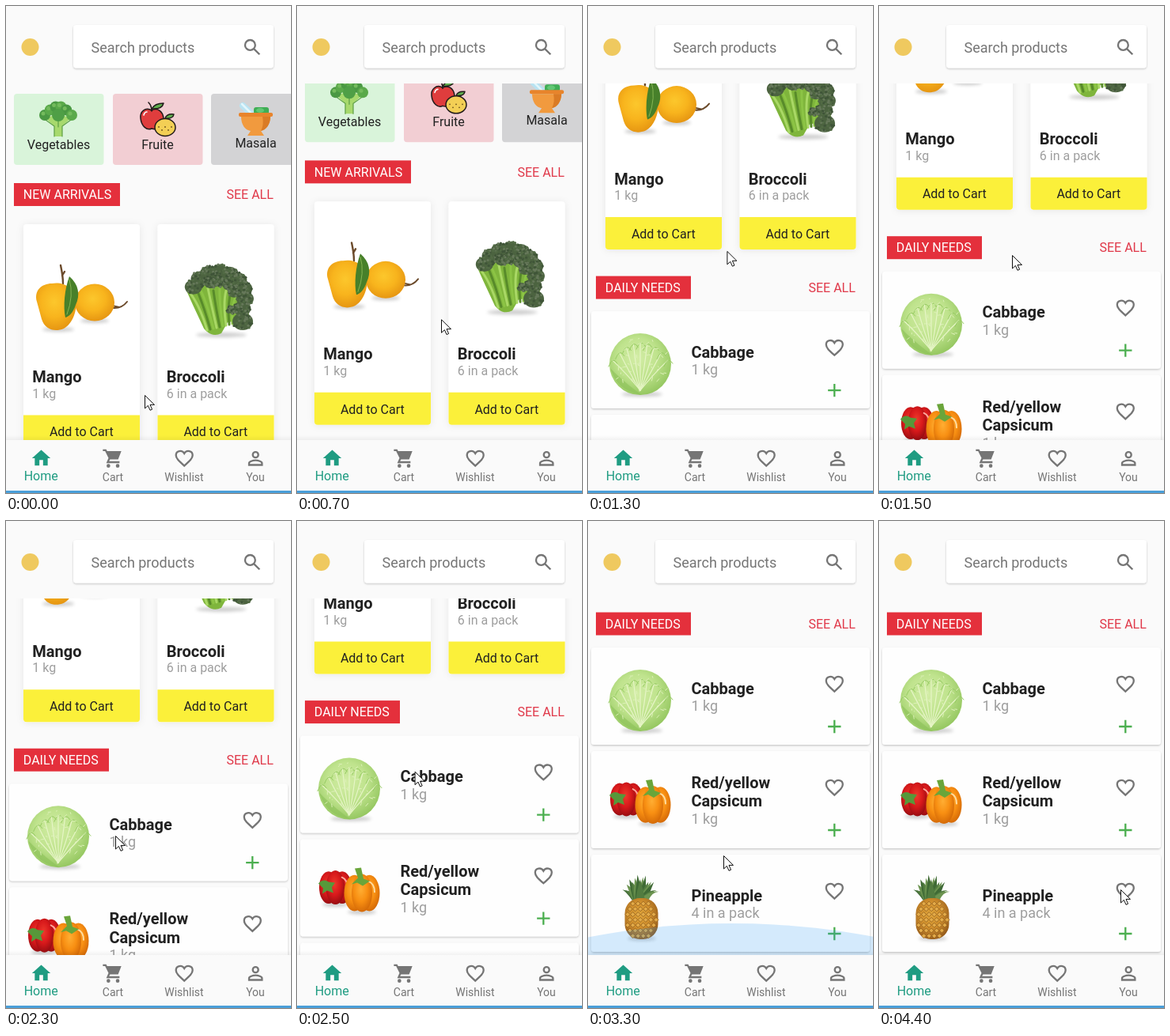
An HTML page for the animation above (5 s loop, 360 px wide and 616 px high).

```html
<!DOCTYPE html>
<html lang="en">
<head>
<meta charset="utf-8">
<title>Grocery shop</title>
<style>
html, body { margin: 0; width: 100%; height: 100%; overflow: hidden; background: #fafafa; }
svg { display: block; width: 360px; height: 616px; font-family: Roboto, sans-serif; }
</style>
</head>
<body>
<svg viewBox="0 0 360 616">
  <defs id="defs">
    <clipPath id="view"><rect y="98" width="360" height="451"/></clipPath>
    <filter id="lift" x="-10%" y="-20%" width="120%" height="140%">
      <feDropShadow dx="0" dy="1.2" stdDeviation="1.2" flood-opacity=".22"/>
    </filter>
    <filter id="soft" x="-20%" y="-10%" width="140%" height="120%">
      <feDropShadow dx="0" dy="1" stdDeviation="5" flood-opacity=".08"/>
    </filter>
    <filter id="blur" x="-30%" y="-100%" width="160%" height="300%"><feGaussianBlur stdDeviation="2"/></filter>
    <linearGradient id="edge" x1="0" y1="0" x2="0" y2="1">
      <stop stop-opacity="0"/><stop offset="1" stop-opacity=".05"/>
    </linearGradient>
  </defs>
  <rect width="360" height="616" fill="#fafafa"/>
  <g clip-path="url(#view)">
    <g id="list"></g>
    <ellipse id="glow" cx="182" rx="540" fill="#2196f3"/>
  </g>
  <g id="bars"></g>
  <path id="mouse" d="M0 0V16.5L3.9 12.9 6.5 18.8 9.1 17.7 6.5 11.9H12Z" fill="#fff" stroke="#111" stroke-linejoin="round"/>
</svg>
<script>
const $ = id => document.getElementById(id);
const GREY = '#757575', RED = '#e4303c', GREEN = '#1f9c82', DARK = '#212121';

let seed = 7;
const rnd = () => (seed = seed * 16807 % 2147483647) / 2147483647;
const loop = (n, f) => Array.from({ length: n }, (_, i) => f(i)).join('');

const rect = (x, y, w, h, fill, more = '') =>
  `<rect x="${x}" y="${y}" width="${w}" height="${h}" fill="${fill}" ${more}/>`;
const oval = (x, y, rx, ry, fill, more = '') =>
  `<ellipse cx="${x}" cy="${y}" rx="${rx}" ry="${ry}" fill="${fill}" ${more}/>`;
const path = (d, fill, more = '') => `<path d="${d}" fill="${fill}" ${more}/>`;
const line = (d, color, w = 1) => path(d, 'none', `stroke="${color}" stroke-width="${w}" stroke-linecap="round"`);
const text = (s, x, y, size, fill, more = '') =>
  `<text x="${x}" y="${y}" font-size="${size}" fill="${fill}" ${more}>${s}</text>`;
const mid = (s, x, y, size, fill) => text(s, x, y, size, fill, 'text-anchor="middle"');
const bold = (s, x, y) => text(s, x, y, 20, DARK, 'font-weight="700"');
const shade = (x, y, rx) => oval(x, y, rx, 3, '#000', 'opacity=".2" filter="url(#blur)"');
const ring = (x, y, r) => `M${x - r} ${y}a${r} ${r} 0 1 1 ${2 * r} 0a${r} ${r} 0 1 1 ${-2 * r} 0`;

function ball(id, ...colors) {
  $('defs').innerHTML += `<radialGradient id="${id}" cx=".45" cy=".4" r=".65">` +
    colors.map((c, i) => `<stop offset="${i / 2}" stop-color="${c}"/>`).join('') + '</radialGradient>';
}
ball('mango', '#fcc72c', '#f8b41d', '#e39110');
ball('cabbage', '#d3eda6', '#bfe38d', '#8fc35a');
ball('red', '#ee3a2c', '#d8191b', '#8d0b10');
ball('orange', '#ffae33', '#f88f12', '#cf6405');
ball('pine', '#e0a53b', '#cf8e2c', '#93591a');

// Each icon is a filled part and a stroked part on a 24 unit grid.
const ICON = {
  home: ['M10 20v-6h4v6h5v-8h3L12 3 2 12h3v8z', ''],
  cart: ['M5 4H21L17.5 13H8.5Z' + ring(7, 20, 2) + ring(17, 20, 2), 'M1 3H4L8.2 11.5 6.2 16H19'],
  heart: ['', 'M12 20C6 14.6 3 11.9 3 8.5C3 3.6 9.5 2.3 12 6.6C14.5 2.3 21 3.6 21 8.5C21 11.9 18 14.6 12 20Z'],
  user: ['', ring(12, 8, 3) + 'M5 19V17C5 15.5 9 14 12 14S19 15.5 19 17V19Z'],
  search: ['', ring(9.5, 9.5, 5.5) + 'M13.5 13.5L19.7 19.7'],
  plus: ['', 'M5 12H19M12 5V19']
};
const icon = (name, x, y, color) =>
  `<g transform="translate(${x - 14} ${y - 14}) scale(1.1667)">` +
  path(ICON[name][0], color) + path(ICON[name][1], 'none', `stroke="${color}" stroke-width="2"`) + '</g>';

function mango() {
  return shade(66, 409, 20) + shade(112, 398, 18) +
    line('M135 382Q146 383 153 374M143 381L134 379', '#6b4a2b', 2) +
    oval(112, 375, 25, 23.5, 'url(#mango)') +
    line('M72 351Q72 342 69 328M71 341L74 336', '#6b4a2b', 2.4) +
    path('M39 374C35 360 45 351 58 351C72 348 87 357 89 369C90 386 84 402 73 408C61 413 49 409 45 396Z', 'url(#mango)') +
    path('M80 342C92 352 94 366 88 378C85 388 79 393 75 394C72 380 74 358 80 342Z', '#47802a') +
    line('M80 346Q86 366 77 390', '#86b654');
}

// A round tuft filled with small random buds.
function tuft(x, y, r) {
  return oval(x, y, r, r * .85, '#4c6340') + loop(35, i => {
    const a = rnd() * 6.283, d = Math.sqrt(rnd()) * r;
    return oval(x + d * Math.cos(a), y + d * .88 * Math.sin(a), 1.6, 1.5, ['#3f5438', '#66785a', '#526b45'][i % 3]);
  });
}

function broccoli() {
  const fan = (n, from, to, k, r) => loop(n, i => {
    const a = (from + (to - from) * i / (n - 1)) * Math.PI;
    return tuft(268 + 34 * k * Math.cos(a), 368 + 32 * k * Math.sin(a), r);
  });
  return shade(272, 416, 32) +
    path('M227 358L236 378 250 408Q260 420 272 414L280 400 308 396 300 352 262 344Z', '#7fb53c') +
    loop(9, i => line(`M${230 + i * 8} ${360 - i % 2 * 8}Q${244 + i * 5} 376 ${254 + i * 4} ${410 - i}`,
      ['#a9d865', '#588b2a', '#8cc445'][i % 3], 3)) +
    fan(9, 1.13, 2.15, 1, 11) + fan(4, 1.35, 1.9, .62, 8) + tuft(299, 399, 13) + tuft(285, 384, 6);
}

function cabbage() {
  return shade(68, 265, 26) + oval(66, 227, 39, 39, 'url(#cabbage)') +
    path('M28 232C36 256 50 262 68 266C46 250 36 240 28 232Z', '#8cc259', 'opacity=".6"') +
    loop(9, i => {
      const k = i / 4 - 1, x = 66 + 35 * k, y = 200 + 22 * k * k;
      return line(`M66 260Q${66 + 18 * k} 238 ${x} ${y}`, '#e6f5c6', 1.2) +
        line(`M${x - 5} ${y + 8}Q${x} ${y - 6} ${x + 6} ${y + 4}`, '#97cb63');
    }) +
    loop(45, () => {
      const a = rnd() * 6.283, d = Math.sqrt(rnd()) * 34;
      return line(`M${66 + d * Math.cos(a)} ${226 + d * Math.sin(a)}l${rnd() * 8 - 4} ${rnd() * 8 - 4}`, '#e0f2bd', .9);
    });
}

const pepper = (x, y, w, h, fill, gleam) => shade(x, y + h, w * .8) +
  [-.42, .42, 0].map(k => oval(x + w * k, y, w * .58, h * (k ? .95 : 1), fill)).join('') +
  line(`M${x + w * .4} ${y - h * .6}q7 3 7 13`, gleam, 2);

const peppers = () =>
  pepper(48.5, 352, 20.5, 21.5, 'url(#red)', '#ffa99e') +
  path('M27 347Q33 340 40 345L48 346 44 352 46 359 38 356 32 360 33 353Z', '#57983a') +
  pepper(82, 359, 22.5, 24, 'url(#orange)', '#ffdca0') +
  path('M73 328L81 327 84 341 92 344 83 350 76 346 69 348 77 340Z', '#6aa53a');

function pineapple() {
  const leaf = i => {
    const a = (i * 8 % 15 - 7) / 7;
    return path(`M${60 + 4 * a} 480Q${62 + 16 * a} 466 ${66 + 24 * a} ${447 + 19 * a * a + i % 3 * 3}` +
      `Q${70 + 12 * a} 468 ${72 + 4 * a} 480Z`, ['#3f6a35', '#6c9450', '#527c40'][i % 3]);
  };
  const scale = i => {
    const r = Math.floor(i / 6), x = 50 + i % 6 * 6.6 + r % 2 * 3, y = 484 + r * 6.8;
    return Math.hypot((x - 67.5) / 20, (y - 504) / 25) < 1 ?
      path(`M${x - 3} ${y}l3-3 3 3-3 3z`, '#e3ab49', 'stroke="#925f1d" stroke-width=".8"') : '';
  };
  return shade(68, 528, 18) + loop(15, leaf) + rect(46.5, 477, 42, 52, 'url(#pine)', 'rx="19"') + loop(42, scale);
}

const vegIcon = () =>
  path('M61 165L61 152 50 142 66 136 82 142 71 152 71 165Z', '#a7d96d') +
  line('M61 165V152L50 144M71 165V152L82 144M66 153V144', '#5c9e44', 1.2) +
  loop(6, i => {
    const x = 49 + i * 6.8, y = 138 - 11 * Math.sin(Math.PI * i / 5);
    return oval(x, y, 7, 7, i % 2 ? '#5aa94a' : '#4a9843') + oval(x - 2, y - 2, 2.5, 2.5, '#74bb5d');
  }) + oval(66, 138, 8, 8, '#4f9f46');

function fruitIcon() {
  const ink = 'stroke="#211a1a" stroke-width="1.5" stroke-linejoin="round"';
  return path('M184 130Q188 123 199 123Q197 131 184 130Z', '#5fae4e', ink) +
    path('M184 132C176 127 169 134 170 142C171 152 178 158 184 155C192 158 199 150 199 142C198 133 191 128 184 132Z', '#df3d3d', ink) +
    line('M184 133Q184 126 180 122', '#211a1a', 1.6) + line('M174 138Q175 134 178 134', '#fff', 1.6) +
    path('M201 142Q203 136 212 137Q211 143 201 142Z', '#5fae4e', ink) +
    oval(201, 153.5, 13, 11, '#f3cf55', ink) +
    loop(5, i => oval(193 + i * 4, 153 + i % 2 * 4, .9, .9, '#6b501c'));
}

const bowlIcon = () =>
  line('M299 126L312 138', '#b9e3f2', 8) + line('M298 124L310 136', '#e3f6fb', 2.5) +
  rect(313, 128, 19, 9, '#3fae55', 'rx="3"') + oval(321, 132, 5, 3, '#62c774') +
  rect(294, 135, 43, 5, '#e8842b', 'rx="2"') +
  path('M297 140H334C334 150 328 157 322 158L326 164H305L309 158C302 157 297 150 297 140Z', '#f19a3e') +
  path('M324 140H334C334 150 328 157 322 158Q326 150 324 140Z', '#da7b25');

const tile = (x, fill, art, label, y) =>
  rect(x, 111, 113.5, 90, fill, 'rx="4"') + art() + mid(label, x + 56.5, y, 16, DARK);

const heading = (y, label, w) => rect(10, y, w, 29, RED) +
  text(label, 21.8, y + 20.3, 16, '#fff') + text('SEE ALL', 278.5, y + 20.3, 16, '#e0394a');

const product = (x, name, amount, art) =>
  rect(x, 276, 147, 282.5, '#fff', 'rx="4" filter="url(#soft)"') + art() +
  bold(name, x + 11.3, 476) + text(amount, x + 11.3, 495.7, 16, '#9e9e9e') +
  path(`M${x} 517.5h147v37a4 4 0 0 1-4 4h-139a4 4 0 0 1-4-4z`, '#fbf03a') +
  mid('Add to Cart', x + 73.3, 544.3, 16, DARK);

// Art and text are placed for the resting position at the end of the list.
function row(i, name, amount, art) {
  const y = 131 * i, names = name.split(' '), extra = 23.4 * (names.length - 1), top = 218.7 + y - extra / 2;
  return rect(4, 160 + y, 352, 123, '#fefefe', 'rx="4" filter="url(#lift)"') + art() +
    names.map((s, k) => bold(s, 130.5, top + 23.4 * k)).join('') +
    text(amount, 130.5, top + extra + 21.6, 18, '#9e9e9e') +
    icon('heart', 311.3, 206.3 + y, GREY) + icon('plus', 311.3, 260 + y, '#4caf50');
}

const REST = 304.3, END = 476.5;

$('list').innerHTML =
  tile(10, '#d9f4da', vegIcon, 'Vegetables', 181) +
  tile(135, '#f2ced3', fruitIcon, 'Fruite', 181) +
  tile(259, '#d3d3d5', bowlIcon, 'Masala', 179) +
  heading(224, 'NEW ARRIVALS', 134) +
  product(22, 'Mango', '1 kg', mango) +
  product(191.5, 'Broccoli', '6 in a pack', broccoli) +
  heading(592, 'DAILY NEEDS', 120) +
  `<g transform="translate(0 ${END})">` +
  row(0, 'Cabbage', '1 kg', cabbage) +
  row(1, 'Red/yellow Capsicum', '1 kg', peppers) +
  row(2, 'Pineapple', '4 in a pack', pineapple) + '</g>';

$('bars').innerHTML =
  oval(30.5, 52, 11, 11, '#efc95f') +
  rect(85, 24, 253, 54.5, '#fff', 'rx="4" filter="url(#lift)"') +
  text('Search products', 107.5, 59, 18, GREY) + icon('search', 311.3, 52.3, GREY) +
  rect(0, 543, 360, 6, 'url(#edge)') + rect(0, 549, 360, 64, '#fafafa') +
  rect(0, 613, 360, 3, '#4a9fd9') +
  icon('home', 44.5, 572, GREEN) + mid('Home', 44.2, 599.7, 16, GREEN) +
  [['cart', 'Cart'], ['heart', 'Wishlist'], ['user', 'You']].map(([name, label], i) =>
    icon(name, 135.2 + 90 * i, 572.3, GREY) + mid(label, 135 + 90 * i, 600.8, 14, GREY)).join('');

// Smooth step from 0 to 1 between two times; a skew above 1 delays the start.
function ease(t, from, to, skew = 1) {
  const u = Math.min(1, Math.max(0, (t - from) / (to - from))) ** skew;
  return u * u * (3 - 2 * u);
}

// Pointer stops: time, x, y.
const STOPS = [[400, 175, 492], [1000, 189, 300.5], [1500, 168, 315], [2300, 138, 398],
  [2800, 168, 167], [3300, 171, 423], [3600, 180, 320], [4400, 305, 466]];

const pointer = t => STOPS.slice(1).reduce((p, s, i) => {
  const k = ease(t, STOPS[i][0], s[0]);
  return { x: p.x + (s[1] - STOPS[i][1]) * k, y: p.y + (s[2] - STOPS[i][2]) * k };
}, { x: STOPS[0][1], y: STOPS[0][2] });

function draw(now) {
  const t = Math.floor((now % 5000 + .01) / 100) * 100;
  const scroll = REST * ease(t, 400, 1560, 1.23) + (END - REST) * ease(t, 2300, 2800);
  const swell = .86 * Math.sin(Math.PI * Math.min(1, Math.max(0, (t - 3100) / 900)));
  const p = pointer(t), glow = $('glow');
  $('list').setAttribute('transform', `translate(0 ${-scroll})`);
  $('mouse').setAttribute('transform', `translate(${p.x + .5} ${p.y + .5})`);
  glow.setAttribute('cy', 549 + 467.7 * swell);
  glow.setAttribute('ry', Math.max(0, 540 * swell));
  glow.setAttribute('opacity', .34 * swell);
}

function tick() {
  draw(performance.now());
  requestAnimationFrame(tick);
}
tick();
</script>
</body>
</html>
```
